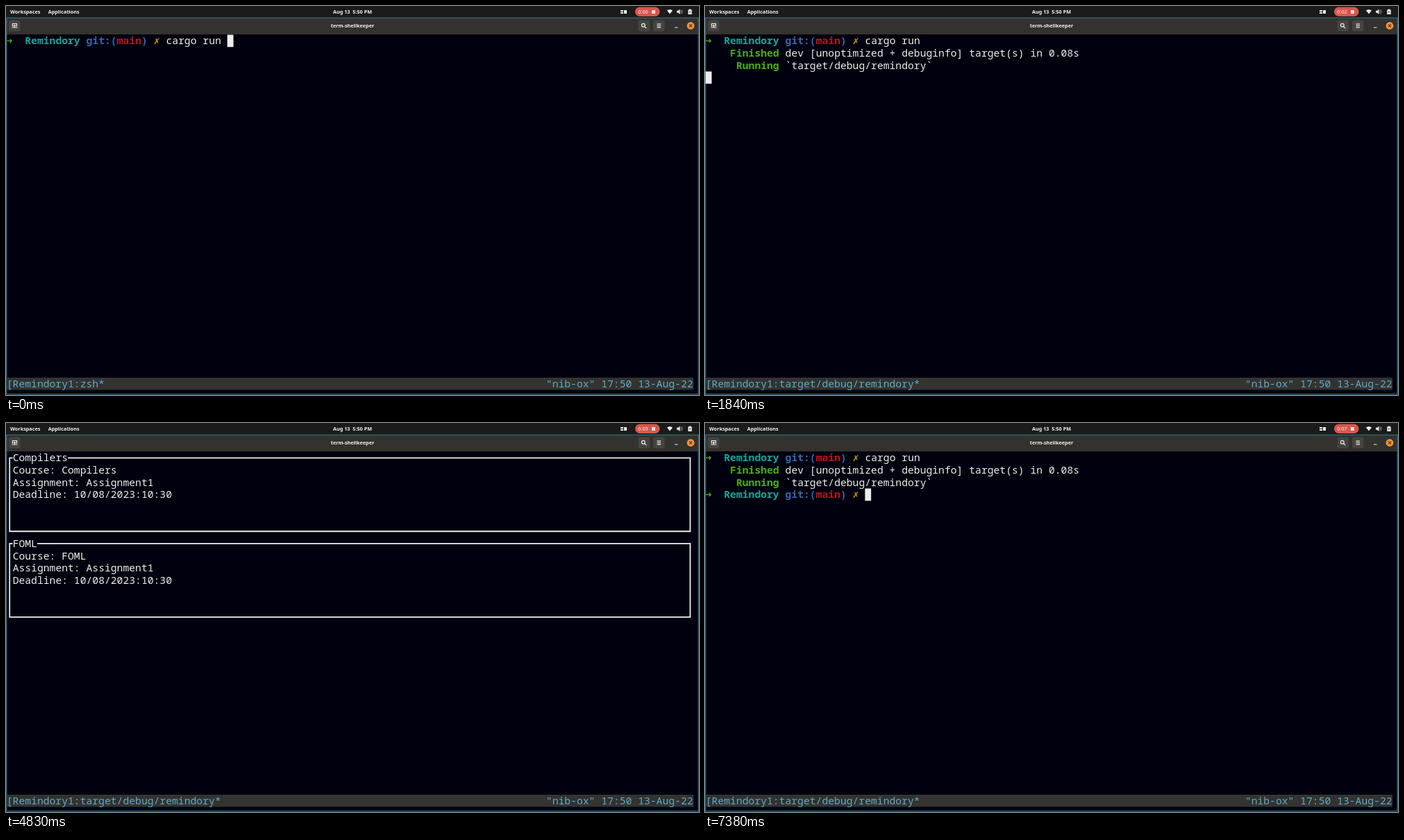
An HTML page that plays this animation: 998 by 561 pixels, repeating every 7550 ms.

```html
<!DOCTYPE html>
<html lang="en">
<head>
<meta charset="utf-8">
<title>Terminal session</title>
<style>
  html, body { margin: 0; width: 100%; height: 100%; overflow: hidden; background: #00000f; }
  svg { display: block; width: 100vw; height: 100vh; }
  text { white-space: pre; }
  .mono { font: 14.71px "Noto Sans Mono", "DejaVu Sans Mono", monospace; }
  .ui { font: 600 7.25px "Noto Sans", "Open Sans", sans-serif; fill: #f2f2f2; }
  .b { font-weight: 700; }
</style>
</head>
<body>
<svg viewBox="0 0 998 561" xmlns="http://www.w3.org/2000/svg">
  <rect width="998" height="561" fill="#00000f"/>
  <rect width="998" height="17" fill="#1b1b1a"/>
  <rect y="17" width="998" height="24" fill="#33322f"/>
  <rect x="1.5" y="536" width="988.5" height="17.6" fill="#333330"/>
  <rect x=".75" y="17.25" width="996.5" height="542.5" fill="none" stroke="#2a6376" stroke-width="1.5"/>

  <g class="ui">
    <text x="6" y="10.8">Workspaces</text>
    <text x="60.7" y="10.8">Applications</text>
    <text x="499" y="10.8" text-anchor="middle">Aug 13  5:50 PM</text>
    <text x="499" y="30.8" text-anchor="middle">term-shellkeeper</text>
    <rect x="906" y="1.5" width="35.5" height="13.6" rx="6.8" fill="#d9564c"/>
    <text id="clock" x="910.3" y="10.8" style="font-weight:500"></text>
    <rect x="930" y="6" width="5" height="5" fill="#f7dedb"/>
  </g>

  <g fill="#eee">
    <path d="M885 6h4v2h-4zM885 9h4v2h-4zM890 6h4v5h-4z"/>
    <path d="M952 6.6q4-3 8 0l-4 5z"/>
    <path d="M966 6.8h2l2.5-2.3v7.5l-2.5-2.3h-2z"/>
    <path d="M971.5 6q2 2.2 0 4.5M973 5q2.8 3.2 0 6.5" fill="none" stroke="#aaa" stroke-width=".8"/>
    <path d="M982.3 5.5h1.4v-1h2.6v1h1.4v6.5h-5.4z"/>
    <path d="M985.3 6.5l-1.5 2.3h1l-.4 2 1.7-2.6h-1z" fill="#222"/>
  </g>

  <g fill="#454440">
    <rect x="4" y="20.5" width="16.5" height="16" rx="3"/>
    <rect x="910.5" y="20.5" width="16.5" height="16" rx="3"/>
    <rect x="932" y="20.5" width="16.5" height="16" rx="3"/>
  </g>
  <g fill="none" stroke="#f0f0f0" stroke-width="1.2">
    <path d="M9.5 29.5v-4h6v4M8.5 31h8M12.5 26.5v4M10.5 28.5h4" />
    <circle cx="917.8" cy="27.7" r="2.4"/>
    <path d="M919.6 29.6l2.6 2.6M937.5 26.2h5.6M937.5 28.5h5.6M937.5 30.8h5.6M963 31h4.5"/>
  </g>
  <circle cx="986" cy="28.5" r="5.4" fill="#f0913a"/>
  <path d="M984 26.5l4 4M988 26.5l-4 4" stroke="#5c3a1a" stroke-width="1.1"/>

  <g id="term" class="mono"></g>
</svg>
<script>
  const LOOP = 7550;
  const CELL = 8.83, ROW = 17.65, LEFT = 0.8, TOP = 41.5;
  const C = {
    fg: '#eeeeec', green: '#4cae0c', cyan: '#14a79a', blue: '#3567b0',
    red: '#c4101a', yellow: '#c4a000', status: '#5cabca'
  };
  const APP = 'target/debug/remindory';
  const term = document.getElementById('term');
  const clock = document.getElementById('clock');

  const colX = c => LEFT + c * CELL;
  const rowY = r => TOP + r * ROW;

  const put = (col, row, str, color = C.fg, bold = false) =>
    `<text x="${colX(col)}" y="${rowY(row) + 13.8}" fill="${color}"${bold ? ' class="b"' : ''}>${str}</text>`;

  const cursor = (col, row) =>
    `<rect x="${colX(col)}" y="${rowY(row)}" width="${CELL}" height="${ROW}" fill="${C.fg}"/>`;

  const prompt = row =>
    put(0, row, '➜', C.green, true) +
    put(3, row, 'Remindory', C.cyan, true) +
    put(13, row, 'git:(', C.blue, true) +
    put(18, row, 'main', C.red, true) +
    put(22, row, ')', C.blue, true) +
    put(24, row, '✗', C.yellow, true);

  const command = () => prompt(0) + put(26, 0, 'cargo run');

  const buildLog = () =>
    put(4, 1, 'Finished', C.green, true) +
    put(13, 1, 'dev [unoptimized + debuginfo] target(s) in 0.08s') +
    put(5, 2, 'Running', C.green, true) +
    put(13, 2, '`' + APP + '`');

  // Bordered panel whose title interrupts the top edge
  function panel(row, rows, title) {
    const x0 = colX(0.5), x1 = colX(111.5);
    const y0 = rowY(row + 0.5), y1 = rowY(row + rows - 0.5);
    const d = `M${colX(1)} ${y0}H${x0}V${y1}H${x1}V${y0}H${colX(1 + title.length)}`;
    return `<path d="${d}" fill="none" stroke="${C.fg}" stroke-width="1.8"/>` + put(1, row, title);
  }

  const page = items => items.map(([course, num, due], i) => {
    const r = i * 7;
    return panel(r, 7, course) +
      put(1, r + 1, 'Course: ' + course) +
      put(1, r + 2, 'Assignment: Assignment' + num) +
      put(1, r + 3, 'Deadline: ' + due);
  }).join('');

  const firstPage = [
    ['Compilers', 3, '21/08/2023:10:30'],
    ['Compilers', 2, '21/08/2023:10:30'],
    ['Operating System', 2, '30/08/2023:12'],
    ['Operating System', 1, '20/08/2023:12']
  ];
  const lastPage = [
    ['Compilers', 1, '10/08/2023:10:30'],
    ['FOML', 1, '10/08/2023:10:30']
  ];

  const finished = () => command() + buildLog() + prompt(3);

  // [start time, screen contents]
  const scenes = [
    [0, () => command() + cursor(36, 0)],
    [1210, () => command() + cursor(0, 1)],
    [1370, () => command() + buildLog() + cursor(0, 3)],
    [2770, () => page(firstPage)],
    [3480, () => page(lastPage)],
    [5050, () => panel(0, 28, 'End') + put(1, 3, 'Press q to exit the application.')],
    [5910, () => command() + buildLog() + cursor(0, 3)],
    [5950, () => finished() + cursor(26, 3)],
    [6500, finished],
    [7040, () => finished() + cursor(26, 3)]
  ];

  const statusLine = job =>
    put(0, 28, `[Remindory1:${job}*`, C.status) +
    put(88, 28, '"nib-ox" 17:50 13-Aug-22', C.status);

  let shown = '';
  function render(t) {
    const scene = scenes.findLastIndex(s => s[0] <= t);
    const job = t < 1840 ? 'zsh' : APP;
    const secs = Math.floor((t + 170) / 1000);
    const key = scene + job + secs;
    if (key === shown) return;
    shown = key;
    clock.textContent = '0:0' + secs;
    term.innerHTML = scenes[scene][1]() + statusLine(job);
  }

  const start = performance.now();
  function tick() {
    render((performance.now() - start) % LOOP);
    requestAnimationFrame(tick);
  }
  tick();
</script>
</body>
</html>
```
